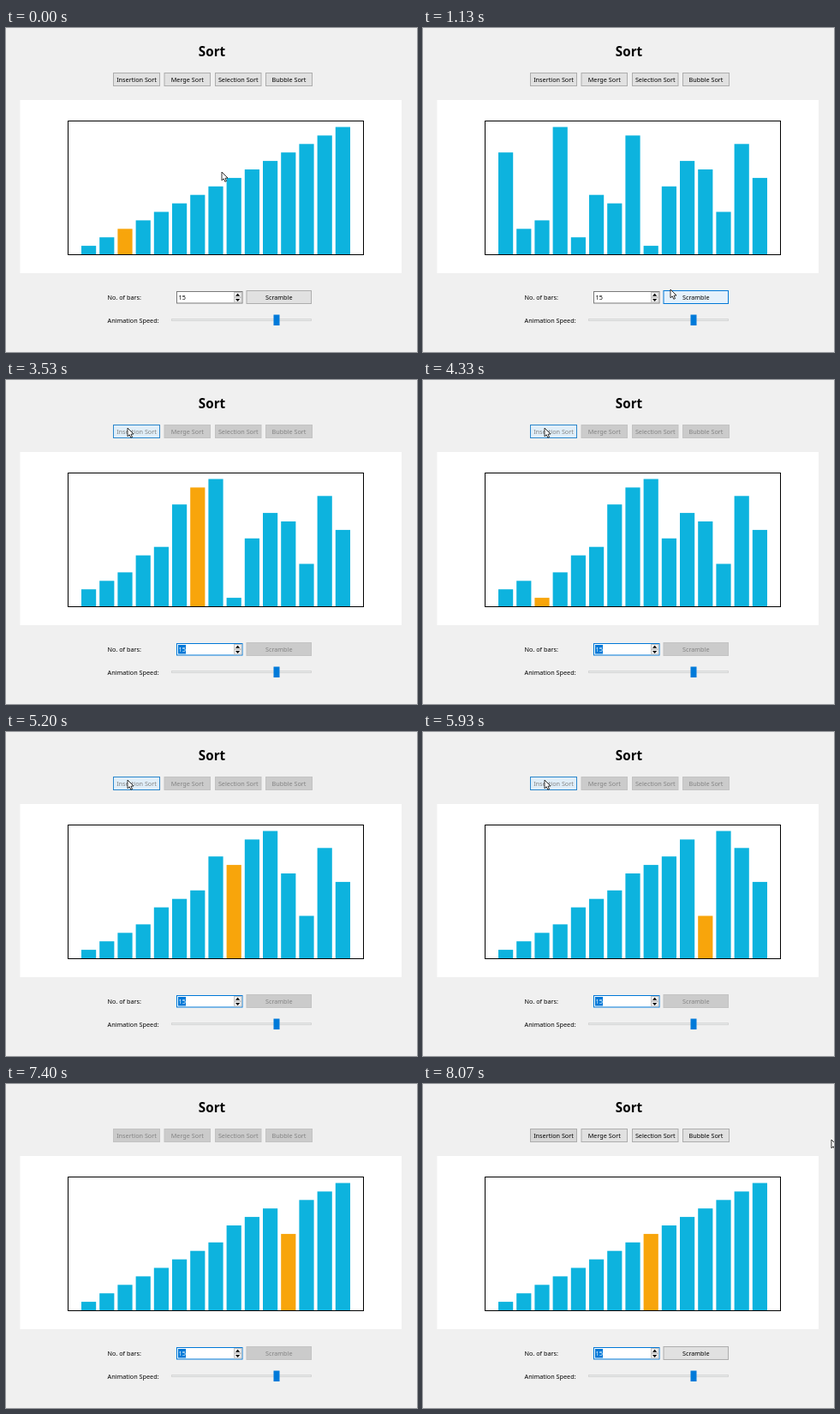
An HTML page with a canvas that plays this animation: 480 px wide and 378 px high, repeating every 8.14 s.

```html
<!DOCTYPE html>
<html lang="en">
<head>
<meta charset="utf-8">
<title>Sort</title>
<style>
  html, body { margin: 0; width: 100%; height: 100%; overflow: hidden; background: #f0f0f0; }
  canvas { display: block; }
</style>
</head>
<body>
<canvas id="stage" width="480" height="378"></canvas>
<script>
const ctx = document.getElementById('stage').getContext('2d');

const LOOP = 8140;
const TICK = LOOP / 122;
const SCRAMBLE_AT = 1050;
const SORT_AT = 2025;
const SWAP_MS = 125;
const FONT = '"Noto Sans", "Open Sans", sans-serif';
const BLUE = '#0db3de';
const ORANGE = '#f8a50b';
const ACCENT = '#0078d7';

const sorted = Array.from({ length: 15 }, (_, i) => i + 1);
const scrambled = [12, 3, 4, 15, 2, 7, 6, 14, 1, 8, 11, 10, 5, 13, 9];

// Every state of the insertion sort, one per swap.
function insertionSteps(values) {
  const bars = values.slice();
  const steps = [{ bars: values, active: -1 }];
  for (let i = 1; i < bars.length; i++) {
    for (let j = i; j > 0 && bars[j - 1] > bars[j]; j--) {
      [bars[j - 1], bars[j]] = [bars[j], bars[j - 1]];
      steps.push({ bars: bars.slice(), active: j - 1 });
    }
  }
  return steps;
}

const steps = insertionSteps(scrambled);
const lastStep = steps.length - 1;
const SORT_END = SORT_AT + lastStep * SWAP_MS;

// Pointer waypoints: time, x, y
const pointerPath = [
  [0, 252, 168], [230, 376, 60], [480, 240, 240], [640, 152, 325],
  [870, 300, 335], [1000, 289, 305], [1270, 289, 305], [1730, 152, 66],
  [1870, 142, 58], [2600, 142, 58], [2750, 142, 56], [6050, 142, 56],
  [6400, 270, 60], [6735, 439, 62], [6800, 490, 64], [7870, 490, 64],
  [8070, 477, 65], [LOOP, 477, 65]
];

function pointerAt(t) {
  const k = Math.max(1, pointerPath.findIndex(p => p[0] >= t));
  const [t0, x0, y0] = pointerPath[k - 1];
  const [t1, x1, y1] = pointerPath[k];
  const u = (t - t0) / (t1 - t0);
  const e = u * u * (3 - 2 * u);
  return [x0 + (x1 - x0) * e, y0 + (y1 - y0) * e];
}

function barState(t) {
  if (t < SCRAMBLE_AT) return { bars: sorted, active: 2 };
  const n = Math.floor((t - SORT_AT) / SWAP_MS);
  return steps[Math.min(lastStep, Math.max(0, n))];
}

function rect(x, y, w, h, fill) {
  ctx.fillStyle = fill;
  ctx.fillRect(x, y, w, h);
}

function box(x, y, w, h, fill, border) {
  rect(x, y, w, h, border);
  rect(x + 1, y + 1, w - 2, h - 2, fill);
}

function text(str, x, y, { size = 7.25, color = '#000', align = 'left', weight = 400 } = {}) {
  ctx.font = `${weight} ${size}px ${FONT}`;
  ctx.textAlign = align;
  ctx.fillStyle = color;
  ctx.fillText(str, x, y);
}

function polygon(points, fill, stroke) {
  ctx.beginPath();
  points.forEach(([x, y]) => ctx.lineTo(x, y));
  ctx.closePath();
  ctx.fillStyle = fill;
  ctx.fill();
  if (stroke) {
    ctx.strokeStyle = stroke;
    ctx.lineWidth = 0.8;
    ctx.stroke();
  }
}

const looks = {
  normal: ['#e1e1e1', '#adadad', '#000'],
  hover: ['#e5f1fb', ACCENT, '#000'],
  disabled: ['#cbcbcb', '#c3c3c3', '#838383'],
  busyHover: ['#e0eef8', '#2a86cc', '#838383'],
  released: ['#d6d6d6', '#adadad', '#000']
};

function button(label, x, y, w, look) {
  const [fill, border, color] = looks[look];
  box(x, y, w, 16, fill, border);
  text(label, x + w / 2, y + 10.9, { align: 'center', color });
}

function insertionLook(t) {
  if (t >= SORT_END) return 'released';
  if (t >= 7150) return 'disabled';
  if (t >= SORT_AT) return 'busyHover';
  return t >= 1800 ? 'hover' : 'normal';
}

function drawChart(t) {
  rect(16.5, 84, 445.5, 202, '#fff');
  ctx.strokeStyle = '#000';
  ctx.lineWidth = 1;
  ctx.strokeRect(72.5, 108.5, 345, 156);
  const { bars, active } = barState(t);
  bars.forEach((value, i) => {
    const h = value * 9.9;
    rect(88 + i * 21.2, 264 - h, 17.2, h, i === active ? ORANGE : BLUE);
  });
}

function drawSpinBox(t) {
  box(199, 307, 77.5, 14.5, '#fff', t >= 2670 ? ACCENT : '#7a7a7a');
  const selected = t >= SORT_AT;
  if (selected) rect(201, 309, 9, 10.5, ACCENT);
  text('15', 201.5, 317, { color: selected ? '#fff' : '#000' });
  box(266, 308, 9.5, 6.5, '#f0f0f0', '#c4c4c4');
  box(266, 314, 9.5, 6.5, '#f0f0f0', '#c4c4c4');
  polygon([[268, 312.8], [270.6, 309.7], [273.2, 312.8]], '#000');
  polygon([[268, 316], [270.6, 319.1], [273.2, 316]], '#000');
}

function drawSlider() {
  box(193, 339, 164, 3, '#e7eaea', '#d6d6d6');
  rect(312.5, 334.5, 7, 12.5, '#007ad9');
}

function drawPointer(t) {
  const [x, y] = pointerAt(t);
  const arrow = [[0, 0], [0, 9.8], [2.2, 7.8], [3.8, 11.3], [5.5, 10.6], [4, 7.2], [7, 7]];
  polygon(arrow.map(([dx, dy]) => [x + dx, y + dy]), '#fff', '#000');
}

function draw(t) {
  const busy = t >= SORT_AT && t < SORT_END;
  const idle = busy ? 'disabled' : 'normal';
  const overScramble = t >= 960 && t < 1400;

  rect(0, 0, 480, 378, '#f0f0f0');
  text('Sort', 240.5, 33.4, { size: 15.2, weight: 700, align: 'center' });

  button('Insertion Sort', 125, 52, 55, insertionLook(t));
  button('Merge Sort', 184.5, 52, 54.5, idle);
  button('Selection Sort', 244, 52, 54.5, idle);
  button('Bubble Sort', 303, 52, 55, idle);

  drawChart(t);
  text('No. of bars:', 118.5, 317);
  drawSpinBox(t);
  button('Scramble', 280.5, 306, 76.5, overScramble ? 'hover' : idle);
  text('Animation Speed:', 118.5, 344);
  drawSlider();
  drawPointer(t);
}

const start = performance.now();

function frame() {
  const t = (performance.now() - start) % LOOP;
  draw(Math.min(121, Math.floor((t + 8) / TICK)) * TICK);
  requestAnimationFrame(frame);
}
frame();
</script>
</body>
</html>
```
